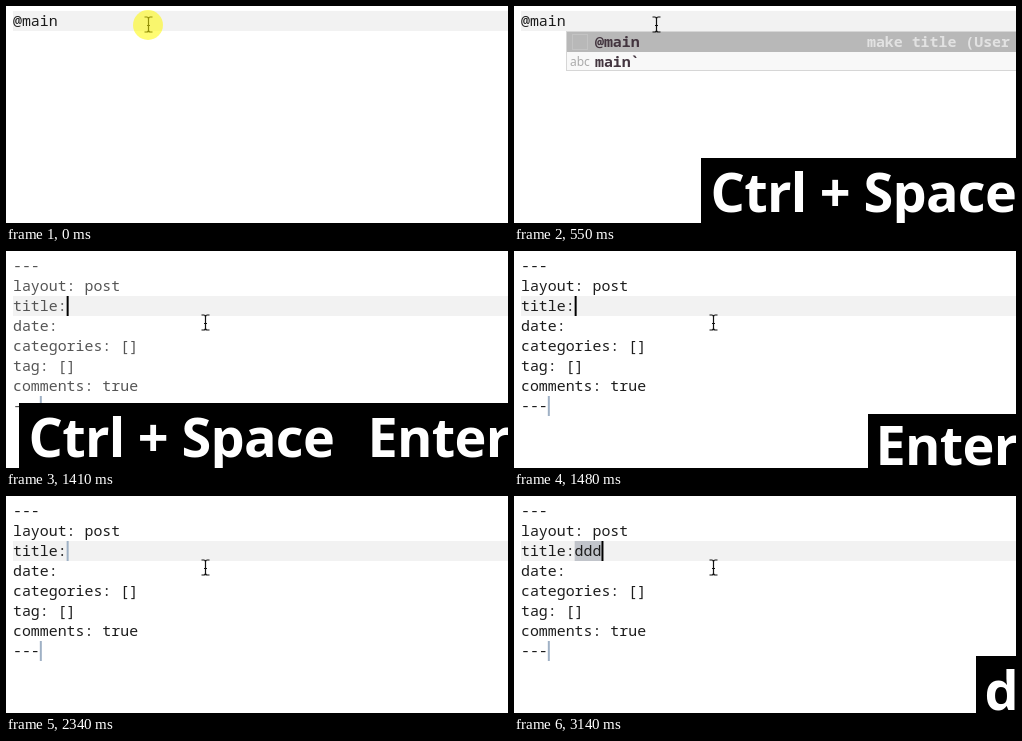
An HTML page that plays this animation: 502x217 px, repeating every 3670 ms.

```html
<!DOCTYPE html>
<html>
<head>
<meta charset="utf-8">
<style>
html, body { margin: 0; width: 100%; height: 100%; overflow: hidden; background: #fff; }
svg { display: block; }
text { font: 14.9px "Noto Sans Mono", monospace; fill: #1c1c1c; white-space: pre; }
.fresh { fill: #555; }
.item { font-weight: 700; fill: #43353f; }
.hint { font-weight: 600; fill: #e2e2e2; }
.kind { font: 500 12px "Noto Sans", sans-serif; fill: #aaa; }
.key { font: 700 54px "Noto Sans", sans-serif; letter-spacing: -.7px; fill: #fff; }
</style>
</head>
<body>
<svg id="stage" width="502" height="217"></svg>
<script>
const LOOP = 3670, CHAR = 8.94, LEFT = 7, ROW = 20, TOP = 5;
const stage = document.getElementById('stage');
const snippet = ['---', 'layout: post', 'title:', 'date:', 'categories: []', 'tag: []', 'comments: true', '---'];

const rect = (x, y, w, h, fill) => `<rect x="${x}" y="${y}" width="${w}" height="${h}" fill="${fill}"/>`;
const text = (x, y, s, cls = '') => `<text x="${x}" y="${y}" class="${cls}">${s}</text>`;
const line = (row, s, cls) => text(LEFT, TOP + row * ROW + 15, s, cls);
const band = row => rect(LEFT, TOP + row * ROW, 495, ROW, '#f2f2f2');
const caret = (row, col, on) => rect(LEFT + col * CHAR, TOP + row * ROW, 2, ROW, on ? '#000' : '#9fb1c5');

function popup() {
  return rect(52.5, 25.5, 460, 39, '#f8f8f8" stroke="#d6d6d6') + rect(53, 26, 449, 20, '#b8b8b8') +
    rect(58.5, 28.5, 15, 15, 'none" stroke="#c3c3c3') +
    text(81, 41, '@main', 'item') + text(353, 41, 'make title (User', 'hint') +
    text(56, 60, 'abc', 'kind') + text(81, 61, 'main`', 'item');
}

// Key banner: box corner, text baseline, then [x, label] pairs
function keys(x, y, base, ...labels) {
  return rect(x, y, 502 - x, 217 - y, '#000') + labels.map(([lx, s]) => text(lx, base, s, 'key')).join('');
}

function pointer(t) {
  const k = t < 870 ? 0 : t < 950 ? .3 : t < 1030 ? .6 : t < 1100 ? .85 : 1;
  const x = Math.round(142 + 57 * k) + .5, y = Math.round(19 + 53 * k) - .5;
  return `<g transform="translate(${x} ${y})">
    <path d="M-4 -7.5h2.2Q0 -7.5 0 -5.5Q0 -7.5 1.8 -7.5H4M0 -6V6M-4 7.5h2.2Q0 7.5 0 5.5Q0 7.5 1.8 7.5H4M-1.5 1h3"
      fill="none" stroke="#111" stroke-width="1.2"/>
    ${t < 170 ? '<circle r="15" cx="-.5" cy=".5" fill="#fffa00" fill-opacity=".55"/>' : ''}</g>`;
}

function trigger(t) {
  let s = band(0) + line(0, '@main');
  if (t >= 170 && t < 550 || t >= 1030) s += caret(0, 5, true);
  if (t >= 550) s += popup() + keys(187, 152, 205.5, [196.5, 'Ctrl + Space']);
  return s;
}

function expanded(t) {
  const typed = t < 2800 ? 0 : t < 3040 ? 1 : t < 3140 ? 2 : 3;
  const tone = t < 1480 ? 'fresh' : '';
  let s = band(2) + rect(LEFT + 6 * CHAR, 45, typed * CHAR, ROW, '#c1c4ca');
  s += snippet.map((l, i) => line(i, i === 2 ? l + 'd'.repeat(typed) : l, tone)).join('');
  s += caret(2, 6 + typed, t < 1870 || t >= 2420) + caret(7, 3, false);
  if (t < 1480) s += keys(13, 152, 205.5, [22.5, 'Ctrl + Space'], [361.5, 'Enter']);
  else if (t < 2340) s += keys(354, 163, 214, [361.5, 'Enter']);
  else if (typed) s += keys(462, 160, 213.5, [470.5, 'd']);
  return s;
}

function draw(now) {
  const t = now % LOOP;
  stage.innerHTML = (t < 1410 ? trigger(t) : expanded(t)) + pointer(t);
  requestAnimationFrame(draw);
}
draw(0);
</script>
</body>
</html>
```
